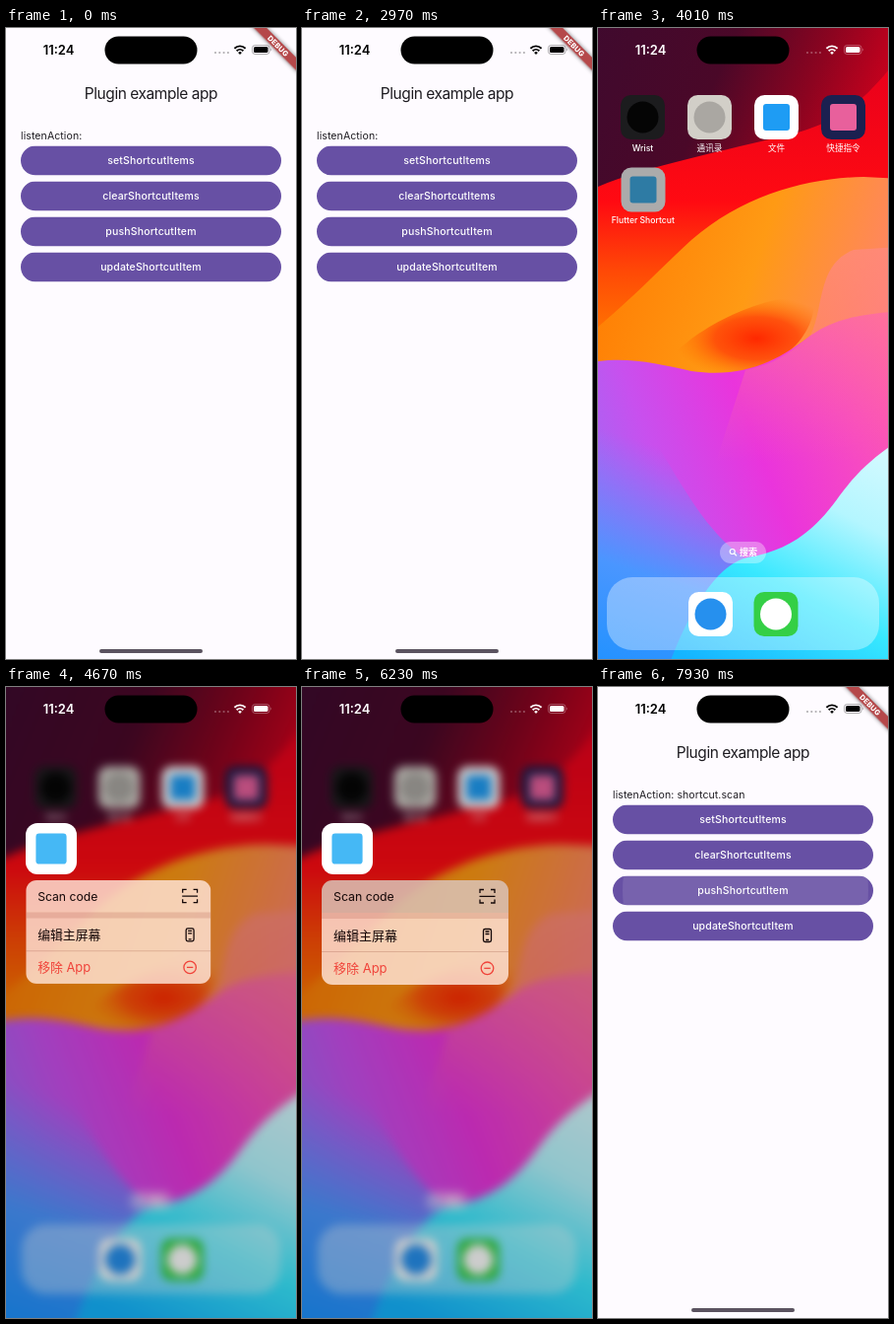
Recreate the animation shown at these times as an HTML page. Size 295 by 640 pixels, loop 8 s.

```html
<!DOCTYPE html>
<html lang="en">
<head>
<meta charset="utf-8">
<title>Shortcut demo</title>
<style>
  html, body { margin: 0; width: 100%; height: 100%; overflow: hidden; background: #000; }
  body { position: relative; font-family: Inter, "Noto Sans CJK SC", "Noto Sans CJK", sans-serif; }
  body > *, #app > *, #home > * { position: absolute; left: 0; top: 0; }
  svg { display: block; overflow: visible; }
  .screen { width: 295px; height: 640px; }
  #wallpaper, #home { transform-origin: 147.5px 320px; }
  #app { width: 295px; overflow: hidden; background: #fefbff; transform-origin: 0 0; color: #000; }
  #app #bar { left: 95px; top: auto; bottom: 6.5px; width: 105px; height: 3.5px; border-radius: 2px; background: #5b5360; }
  #veil { width: 100%; height: 100%; background: #fff; }
  #homeStatus { color: #fff; }
  .label { font-size: 8.6px; font-weight: 500; fill: #fff; text-anchor: middle; }
  .button { font-size: 10.5px; font-weight: 500; letter-spacing: .15px; fill: #fff; text-anchor: middle; }
</style>
</head>
<body>

<div id="home" class="screen">
  <svg id="wallpaper" class="screen" viewBox="0 0 295 640">
    <defs>
      <linearGradient id="red" x1="0" y1="0" x2="0" y2="1">
        <stop offset=".1" stop-color="#e8001c"/><stop offset=".3" stop-color="#ff0a12"/>
        <stop offset=".4" stop-color="#ff4a06"/><stop offset=".5" stop-color="#ff7a00"/>
      </linearGradient>
      <linearGradient id="maroon" x1="0" y1="0" x2="1" y2=".25">
        <stop offset="0" stop-color="#3c0a30"/><stop offset=".5" stop-color="#4a0828"/>
        <stop offset=".75" stop-color="#8c0420"/><stop offset="1" stop-color="#d8001c"/>
      </linearGradient>
      <linearGradient id="orange" x1="0" y1=".3" x2="1" y2=".65">
        <stop offset="0" stop-color="#ff7800"/><stop offset=".45" stop-color="#ff9a14"/>
        <stop offset=".7" stop-color="#ff8a50"/><stop offset="1" stop-color="#ff7a9a"/>
      </linearGradient>
      <radialGradient id="pocket" cx=".62" cy=".55" r=".55">
        <stop offset="0" stop-color="#ff2800"/><stop offset=".5" stop-color="#ff4608" stop-opacity=".85"/>
        <stop offset="1" stop-color="#ff7800" stop-opacity="0"/>
      </radialGradient>
      <linearGradient id="purple" x1="0" y1=".6" x2="1" y2=".2">
        <stop offset="0" stop-color="#8a78f8"/><stop offset=".3" stop-color="#c850ee"/>
        <stop offset=".55" stop-color="#ea34dc"/><stop offset=".8" stop-color="#f84cc0"/>
        <stop offset="1" stop-color="#ff60a8"/>
      </linearGradient>
      <linearGradient id="blend" x1="0" y1="0" x2="0" y2="1">
        <stop offset="0" stop-color="#ff8a80"/><stop offset="1" stop-color="#ff70a0" stop-opacity="0"/>
      </linearGradient>
      <linearGradient id="blue" x1=".35" y1="0" x2="0" y2="1">
        <stop offset=".25" stop-color="#6a88ff" stop-opacity="0"/><stop offset=".6" stop-color="#4a96ff"/>
        <stop offset="1" stop-color="#1090ff"/>
      </linearGradient>
      <linearGradient id="cyan" x1=".9" y1="0" x2=".4" y2="1">
        <stop offset="0" stop-color="#e0fbff"/><stop offset=".35" stop-color="#b4f6ff"/>
        <stop offset=".65" stop-color="#38e8ff"/><stop offset="1" stop-color="#14b4ff"/>
      </linearGradient>
      <g id="status">
        <text x="53.5" y="26.7" font-size="13" font-weight="600" text-anchor="middle">11:24</text>
        <path d="M213 25h14" stroke="currentColor" stroke-width="2.2" stroke-linecap="round" stroke-dasharray="0 4.3" opacity=".3"/>
        <g fill="none" stroke="currentColor" stroke-width="1.9">
          <path d="M232.4 20.7a8 8 0 0 1 11.2 0M234.6 23.2a5 5 0 0 1 6.8 0"/>
        </g>
        <path d="M238 27l-1.9-2a2.8 2.8 0 0 1 3.8 0z"/>
        <rect x="250.5" y="17.5" width="17.5" height="9" rx="2.8" fill="none" stroke="currentColor" stroke-width=".8" opacity=".4"/>
        <rect x="252" y="19" width="14.5" height="6" rx="1.6"/>
        <path d="M269 20.5q1.5 1.5 0 3z" opacity=".45"/>
      </g>
    </defs>
    <rect x="-40" y="-40" width="375" height="720" fill="url(#red)"/>
    <path d="M-40-40H335V-10C285 60 260 92 195 108C130 124 50 140 0 161L-40 178z" fill="url(#maroon)"/>
    <path d="M-40 345V335C20 290 55 252 95 215C150 168 215 152 270 151L335 154V560H-40z" fill="url(#orange)"/>
    <path d="M66 343C90 310 160 270 218 272C226 290 205 352 120 350z" fill="url(#pocket)"/>
    <path d="M-40 342L0 338C35 334 62 341 95 348C150 356 185 336 216 312C245 292 270 290 335 285V680H-40z" fill="url(#purple)"/>
    <path d="M150 347C185 340 200 325 216 312C230 285 222 240 260 225L335 220V440H120z" fill="url(#blend)" opacity=".75"/>
    <path d="M-40 342L0 338C60 400 90 500 150 538L335 560V680H-40z" fill="url(#blue)"/>
    <path d="M335 400C285 430 268 445 246 474C222 508 196 530 152 537C120 545 90 590 60 680H335z" fill="url(#cyan)"/>
  </svg>
  <svg id="icons" class="screen" viewBox="0 0 295 640">
    <rect x="124" y="521" width="47" height="22" rx="11" fill="#fff" opacity=".33"/>
    <g fill="none" stroke="#fff" stroke-width="1.2"><circle cx="136.7" cy="531" r="2.5"/><path d="M138.6 533l2.4 2.4"/></g>
    <text class="label" x="153" y="535.3" style="font-size:9px;font-weight:700">搜索</text>
    <rect x="9" y="557" width="277" height="74" rx="26" fill="#fff" opacity=".35"/>
  </svg>
</div>

<svg id="homeStatus" class="screen" viewBox="0 0 295 640"><use href="#status" fill="currentColor"/></svg>
<svg id="lifted" class="screen" viewBox="0 0 295 640">
  <g id="appIcon"></g>
  <text id="appLabel" class="label" x="45.8" y="198.3">Flutter Shortcut</text>
</svg>

<svg id="menu" class="screen" viewBox="0 0 295 640" style="transform-origin:46px 190px">
  <clipPath id="menuShape"><rect x="20" y="196" width="190" height="106" rx="11"/></clipPath>
  <g clip-path="url(#menuShape)">
    <rect x="20" y="196" width="190" height="106" fill="#ffe4d8" opacity=".82"/>
    <rect id="menuTap" x="20" y="196" width="190" height="33" opacity=".12"/>
    <path d="M20 232H210" stroke="#b05040" stroke-width="6" opacity=".2"/>
    <path d="M20 268.5H210" stroke="#803020" stroke-width=".7" opacity=".3"/>
  </g>
  <g font-size="13" fill="#150808">
    <text x="32" y="217" font-size="12.3">Scan code</text>
    <text x="32" y="256.6">编辑主屏幕</text>
    <text x="32" y="290" fill="#f0433a">移除 App</text>
  </g>
  <g fill="none" stroke="#150808" stroke-width="1.3">
    <path d="M181 209v-3.500h4M192 205.500h4v3.500M196 215.500v3.500h-4M185 219h-4v-3.500M180.500 212.300h16"/>
    <rect x="184.500" y="245.500" width="8" height="13" rx="1.800"/>
    <path d="M186.500 248h4M186.500 250.500h4M187 256.500h3"/>
    <g stroke="#f0433a"><circle cx="188.500" cy="285.300" r="6.300"/><path d="M185.300 285.300h6.400"/></g>
  </g>
</svg>

<div id="app">
  <svg class="screen" viewBox="0 0 295 640">
    <use href="#status" fill="currentColor"/>
    <text x="147.500" y="71.500" font-size="15.500" letter-spacing="-.45" text-anchor="middle" fill="#1d1b20">Plugin example app</text>
    <text id="action" x="15" y="112.700" font-size="10.500" letter-spacing=".1" fill="#1d1b20"></text>
    <g id="buttons"></g>
    <g transform="translate(295) rotate(45)">
      <rect x="-34" y="21" width="68" height="9.300" fill="#b5484a" style="filter:drop-shadow(0 0 2px #0008)"/>
      <text y="28.400" font-size="7.400" font-weight="800" letter-spacing=".2" fill="#fff" text-anchor="middle">DEBUG</text>
    </g>
  </svg>
  <div id="bar"></div>
  <div id="veil"></div>
</div>

<svg class="screen" viewBox="0 0 295 640"><rect x="100.500" y="8.500" width="94" height="28" rx="14"/></svg>

<script>
const $ = id => document.getElementById(id);
const LOOP = 8000;
// Screen updates happen in bursts: first update, last update, number of updates.
const BURSTS = [[1460, 1810, 4], [2970, 3770, 8], [3890, 4670, 8], [4770, 5320, 6], [6230, 6920, 7], [7820, 7930, 2]];

const clamp = v => Math.max(0, Math.min(1, v));
const ramp = (t, from, to) => clamp((t - from) / (to - from));
const smooth = u => u * u * (3 - 2 * u);
const mix = (a, b, u) => a + (b - a) * u;

function tile(x, y, color, mark, square) {
  const shape = square
    ? `<rect x="${x + 9}" y="${y + 9}" width="27" height="27" rx="3" fill="${mark}"/>`
    : `<circle cx="${x + 22.5}" cy="${y + 22.5}" r="16" fill="${mark}"/>`;
  return `<rect x="${x}" y="${y}" width="45" height="45" rx="10.5" fill="${color}"/>${shape}`;
}

const homeIcons = [
  [23, 68, '#1c1c1e', '#050505', false, 'Wrist'],
  [91, 68, '#d2cfc8', '#aaa7a2', false, '通讯录'],
  [159, 68, '#ffffff', '#1e9cf4', true, '文件'],
  [227, 68, '#1b2050', '#e8609c', true, '快捷指令'],
  [92, 572, '#ffffff', '#2690ee', false, ''],
  [158.5, 572, '#34cf46', '#ffffff', false, ''],
];
$('icons').innerHTML += homeIcons.map(([x, y, color, mark, square, label]) =>
  tile(x, y, color, mark, square) + `<text class="label" x="${x + 22.5}" y="${y + 57.2}">${label}</text>`).join('');
$('appIcon').innerHTML = tile(23, 141, '#ffffff', '#45b8f5', true);

$('buttons').innerHTML = ['setShortcutItems', 'clearShortcutItems', 'pushShortcutItem', 'updateShortcutItem'].map((name, i) => {
  const y = 119.5 + 36 * i;
  return `<clipPath id="pill${i}"><rect x="15" y="${y}" width="265" height="30" rx="15"/></clipPath>
    <g clip-path="url(#pill${i})"><rect x="15" y="${y}" width="265" height="30" fill="#6750a4"/>
    <circle id="ripple${i}" cx="150" cy="${y + 15}" fill="#fff"/></g>
    <text class="button" x="147.5" y="${y + 18.8}">${name}</text>`;
}).join('');

function heldTime(t) {
  let held = 0;
  for (const [start, end, count] of BURSTS) {
    if (t < start) break;
    const step = (end - start) / (count - 1);
    held = start + step * Math.min(count - 1, Math.floor((t - start + 1) / step));
  }
  return held;
}

function drawRipple(i, dt) {
  $('ripple' + i).setAttribute('r', dt < 0 ? 0 : 40 + 85 * clamp(dt / 110));
  $('ripple' + i).setAttribute('opacity', dt < 0 ? 0 : .1 * (1 - ramp(dt, 120, 350)));
}

// Window grows from an icon-sized square (p = 0) to the full screen (p = 1).
function drawWindow(p, x, y, size) {
  const scale = mix(size, 295, p) / 295;
  const height = mix(size, 640, p ** 1.45);
  const app = $('app').style;
  app.display = p > 0 ? '' : 'none';
  app.transform = `translate(${x * (1 - p)}px, ${y * (1 - p * p)}px) scale(${scale})`;
  app.height = height / scale + 'px';
  app.borderRadius = Math.min(28, size / 4 + 60 * p, (1 - p) * 400) / scale + 'px';
  app.opacity = clamp(p * 4);
  $('veil').style.opacity = clamp((1 - p) * 1.2);
}

function render(time) {
  const t = heldTime(time);
  const closing = 1 - smooth(ramp(t, 2970, 3425));
  const opening = t < 6230 ? 0 : t >= 6915 ? 1 : 1 - Math.exp((6230 - t) / 94);
  if (t < 3890) drawWindow(closing, 23, 141, 45);
  else drawWindow(opening, 20, 138, 52);

  $('action').textContent = 'listenAction:' + (t > 6680 ? ' shortcut.scan' : '');
  drawRipple(0, t - 1460);
  drawRipple(2, t - 7820);

  const lift = smooth(ramp(t, 4050, 4550));
  const dim = Math.max(closing, lift);
  const settle = ramp(t, 3770, 2970) ** 2;
  $('wallpaper').style.transform = `scale(${1 + .25 * settle})`;
  $('home').style.transform = `scale(${1 - .05 * Math.max(settle, lift)})`;
  $('home').style.filter = dim ? `blur(${5 * dim + 4 * opening}px) brightness(${1 - .2 * dim - .22 * opening})` : 'none';
  $('homeStatus').style.opacity = 1 - .65 * opening;

  const pressed = ramp(t, 3800, 4000) * (1 - ramp(t, 4100, 4350));
  const grow = 1 + .155 * lift;
  $('lifted').style.opacity = 1 - ramp(closing, .05, .5);
  $('appIcon').setAttribute('transform', `translate(46 164) scale(${grow}) translate(-45.5 -163.5)`);
  $('appIcon').style.filter = `brightness(${1 - .33 * pressed})`;
  $('appLabel').style.opacity = 1 - clamp(lift * 2);

  const menu = 1 - (1 - ramp(t, 4300, 4780)) ** 3;
  $('menu').style.opacity = clamp(menu * 2) * clamp(1 - 1.5 * opening);
  $('menu').style.transform = `scale(${mix(.2, 1, menu)})`;
  $('menuTap').style.display = t >= 6230 ? '' : 'none';
}

const began = performance.now();
function tick() {
  render((performance.now() - began) % LOOP);
  requestAnimationFrame(tick);
}
tick();
</script>
</body>
</html>
```
